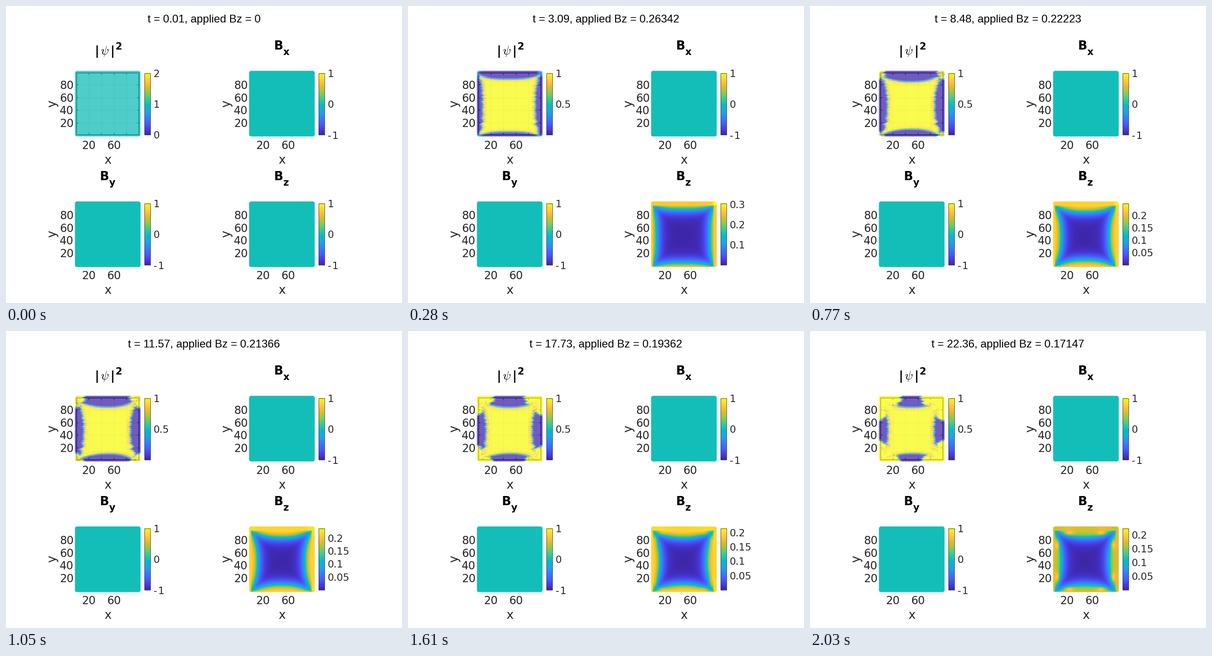
Animation, 864 px wide and 648 px high, one loop 2100 ms. Source, as a matplotlib script:

```python
import numpy as np
import matplotlib.pyplot as plt
from matplotlib.animation import FuncAnimation
from matplotlib.colors import LinearSegmentedColormap
from matplotlib.patches import Rectangle

W, H, DPI = 864, 648, 100
FRAMES, STEP = 30, 70
INK = "#262626"
SIDE = 144          # panel size in pixels
SPAN = 135.0        # physical domain inside the panel
TICK_PX = {20: 27, 40: 54.5, 60: 82, 80: 109.5}

PARULA = LinearSegmentedColormap.from_list("parula", [
    (0, (.2422, .1504, .6603)), (4 / 63, (.2706, .2147, .8364)),
    (8 / 63, (.2813, .3006, .9414)), (12 / 63, (.2699, .3892, .9906)),
    (16 / 63, (.1963, .4847, .9892)), (20 / 63, (.1687, .5703, .9359)),
    (24 / 63, (.1248, .6459, .8883)), (28 / 63, (.0297, .7082, .8163)),
    (30 / 63, (.0067, .7312, .7660)), (32 / 63, (.0964, .7500, .7120)),
    (36 / 63, (.2161, .7843, .5923)), (40 / 63, (.3909, .8029, .4354)),
    (44 / 63, (.6174, .7876, .2612)), (48 / 63, (.8203, .7498, .1535)),
    (52 / 63, (.9728, .7298, .2394)), (53 / 63, (.9956, .7434, .2371)),
    (56 / 63, (.9892, .8136, .1885)), (60 / 63, (.9597, .9135, .1423)),
    (1, (.9769, .9839, .0805))], N=256)

# Applied field and peak field at a few steps
KEYS = [0, 1, 2, 3, 4, 8, 15, 19, 23, 29]
APPLIED = [0, .31483, .29217, .27596, .26342, .22865, .21366, .20611, .19362, .17147]
PEAK = [1, .362, .337, .319, .3045, .2557, .2367, .2285, .2140, .2230]

rng = np.random.default_rng(4)
py, px = np.mgrid[0:SIDE, 0:SIDE] + 0.5
rows = np.floor(py / 1.4).astype(int)
row_noise = rng.normal(0, 1.2, 110)[rows]
grain = rng.random((72, 72)).repeat(2, 0).repeat(2, 1)


def smooth(a, b, x):
    t = np.clip((x - a) / (b - a), 0, 1)
    return t * t * (3 - 2 * t)


def rounded_mask(half=71.6, r=4.5):
    qx = np.abs(px - SIDE / 2) - half + r
    qy = np.abs(py - SIDE / 2) - half + r
    dist = np.hypot(np.maximum(qx, 0), np.maximum(qy, 0)) + np.minimum(np.maximum(qx, qy), 0) - r
    return np.clip(0.5 - dist, 0, 1)


MASK = rounded_mask()


def sides(jitter=0):
    """Depth from each edge and the offset along that edge."""
    x = np.clip(px - 3 + jitter, 0, SPAN)
    y = np.clip(SIDE - py - 0.5, 0, SPAN)
    u, v = np.abs(x - SPAN / 2), np.abs(y - SPAN / 2)
    return [(x, v), (SPAN - x, v), (y, u), (SPAN - y, u)]


def front(n, s):
    power = 2.3 + 2 * np.exp(-n / 5)
    return 17.2 * (1 - np.exp(-n / 4.6)) * (1 - (s / (SPAN / 2)) ** power)


def open_width(n):
    return 79 - 2 * n


def psi_field(n):
    if n == 0:
        return np.full((SIDE, SIDE), 0.5)
    v_off = np.abs(py / SIDE * 2 - 1)
    jitter = row_noise * (1 + 1.3 * v_off ** 2 * min(1, n / 15))
    out = np.ones((SIDE, SIDE))
    for i, (depth, s) in enumerate(sides(jitter)):
        a = depth - front(n, s)
        b = s - open_width(n) - 0.7 * depth
        g = np.maximum(a, b)
        val = smooth(-3.5, 4.5, g)
        fringe = 0.2 if i < 2 else 0.1
        val = val - fringe * grain * np.exp(-((a - 5) / 3) ** 2) * (b < 12)
        if n > 9:
            band = np.exp(-(a / 3) ** 2) * np.clip(1 - b / 28, 0, 1) * (b > 0)
            val = np.minimum(val, 1 - 0.85 * grain ** 2.5 * band)
        out = np.minimum(out, val)
    return np.clip(out, 0, 1)


def bz_field(n, level):
    if n == 0:
        return np.full((SIDE, SIDE), 0.5)
    total, spots, edge = 0, 0, SPAN
    gain = 0.23 * np.clip((n - 12) / 17, 0, 1) ** 1.3
    for depth, s in sides():
        y = depth - front(n, s)
        total = total + (1 + np.exp((y + 6) / 3)) ** (-4 / 3)
        edge = np.minimum(edge, depth)
        spots = spots + np.exp(-((s - open_width(n) - 15) / 11) ** 2 - ((depth - 7) / 5) ** 2)
    field = level * np.minimum(1, (total + np.exp(-edge / 3.5 * 4)) ** 0.25)
    field = field + gain * spots
    dot = np.hypot(px - 139, py - 5) < 4.6
    field = field + dot * (1 - level) * np.clip(1 - (n - 8) / 12, 0, 1)
    return np.clip(field, 0, 1)


def shade(field, alpha=1.0):
    rgba = PARULA(field)
    rgba[..., 3] = MASK * alpha
    return rgba


fig = plt.figure(figsize=(W / DPI, H / DPI), dpi=DPI, facecolor="white")
ax = fig.add_axes([0, 0, 1, 1])


def text(x, base, s, px_size, ha="center", color=INK, **kw):
    kw.setdefault("family", "DejaVu Sans")
    return ax.text(x, base, s, fontsize=px_size * 72 / DPI, ha=ha, va="baseline",
                   color=color, **kw)


def centred(x, y, s, px_size, ha="center"):
    return text(x, y + 0.365 * px_size, s, px_size, ha)


def line(xs, ys, width, color=INK, **kw):
    ax.plot(xs, ys, color=color, lw=width * 72 / DPI, solid_capstyle="butt", **kw)


def picture(data, x, y, w, h):
    return ax.imshow(data, extent=(x, x + w, y + h, y), aspect="auto",
                     interpolation="nearest", zorder=3)


def frame_box(x, y):
    """Box, grid and ticks that show through the translucent panel."""
    l, r, t, b = x + 4.3, x + 139.8, y + 5, y + 139.8
    for p in TICK_PX.values():
        gx, gy = l + p - 0.6, b - p + 0.8
        line([gx, gx], [t, b], 1.3, "#dfdfdf", zorder=1)
        line([l, r], [gy, gy], 1.3, "#dfdfdf", zorder=1)
        for e, d in ((t, 4), (b, -4)):
            line([gx, gx], [e, e + d], 1.8, zorder=2)
        for e, d in ((l, 4), (r, -4)):
            line([e, e + d], [gy, gy], 1.8, zorder=2)
    ax.add_patch(Rectangle((l, t), r - l, b - t, fill=False, ec=INK,
                           lw=2.2 * 72 / DPI, zorder=2))


def panel(x, y, field, alpha=1.0):
    img = picture(shade(field, alpha), x, y, SIDE, SIDE)
    top = 141 if y < 300 else 425
    for v, p in TICK_PX.items():
        centred(x - 2.3, top + 141 - p, str(v), 24, "right")
        if v in (20, 60):
            centred(x + 4 + p, top + 162, str(v), 24)
    text(x + 72, top + 202.5, "x", 26.4)
    text(x - 41.5, top + 72, "y", 26.4, rotation=90, rotation_mode="anchor")
    bar_y = top + 5
    ramp = PARULA(np.linspace(1, 0, 135))[:, None, :]
    picture(ramp, x + 152, bar_y, 13, 135)
    ax.add_patch(Rectangle((x + 151.5, bar_y + .5), 13.5, 134.5, fill=False, ec=INK,
                           lw=0.8 * 72 / DPI, zorder=4))
    return img


def bar_labels(x, y, labels):
    return [centred(x + 171.6, yy, s, 21.6, "left") for s, yy in labels] if labels else []


def title(x, base, sub):
    text(x - 17.4, base, "B", 26.4, "left", "black", weight="bold")
    text(x + 2.7, base + 12, sub, 21.1, "left", "black", weight="bold")


LEFT, RIGHT, TOP, LOW = 150, 530, 141, 426
MINUS = "-\u200a1"
flat = np.full((SIDE, SIDE), 0.5)

frame_box(LEFT, TOP)
psi_img = panel(LEFT, TOP, flat, 0.75)
panel(RIGHT, TOP, flat)
panel(LEFT, LOW, flat)
bz_img = panel(RIGHT, LOW, flat)

for bx, by in ((RIGHT, 147), (LEFT, 431)):
    bar_labels(bx, by, [("1", by), ("0", by + 67), (MINUS, by + 135)])

for tx in (198, 232.3):
    text(tx, 106, "|", 26.4, color="black", weight="bold")
text(215, 106, r"$\psi$", 26.4, color="black", math_fontfamily="cm")
text(245.5, 95, "2", 21.1, color="black", weight="bold")
title(602, 95, "x")
title(222, 379.5, "y")
title(602, 379.5, "z")

head = text(432, 36, "", 24, color="black", family="Liberation Sans")
psi_text = bar_labels(LEFT, TOP, [("", 147), ("", 214), ("", 281.5)])
bz_text = bar_labels(RIGHT, LOW, [("", 0)] * 6)

ax.set_xlim(0, W)
ax.set_ylim(H, 0)
ax.axis("off")


def set_ticks(items, labels):
    for i, item in enumerate(items):
        s, y = labels[i] if i < len(labels) else ("", 0)
        item.set_text(s)
        item.set_y(y + 0.365 * 21.6)


def draw(n):
    t = int(1 + n * 2235 / (FRAMES - 1)) / 100
    applied = np.interp(n, KEYS, APPLIED)
    peak = np.interp(n, KEYS, PEAK)
    head.set_text(f"t = {t:g}, applied Bz = {applied:.5g}")
    psi_img.set_data(shade(psi_field(n), 0.75))
    bz_img.set_data(shade(bz_field(n, applied / peak)))
    if n == 0:
        set_ticks(psi_text, [("2", 147), ("1", 214), ("0", 281.5)])
        set_ticks(bz_text, [("1", 431), ("0", 498), (MINUS, 566)])
    else:
        set_ticks(psi_text, [("1", 147), ("0.5", 214)])
        step = 0.1 if peak > 0.28 else 0.05
        count = int(peak / step)
        set_ticks(bz_text, [(f"{k * step:.2g}", 565 - 134 * k * step / peak)
                            for k in range(1, count + 1)])
    return [head, psi_img, bz_img, *psi_text, *bz_text]


anim = FuncAnimation(fig, draw, frames=FRAMES, interval=STEP, repeat=True,
                     repeat_delay=0, blit=False)
plt.show()
```
